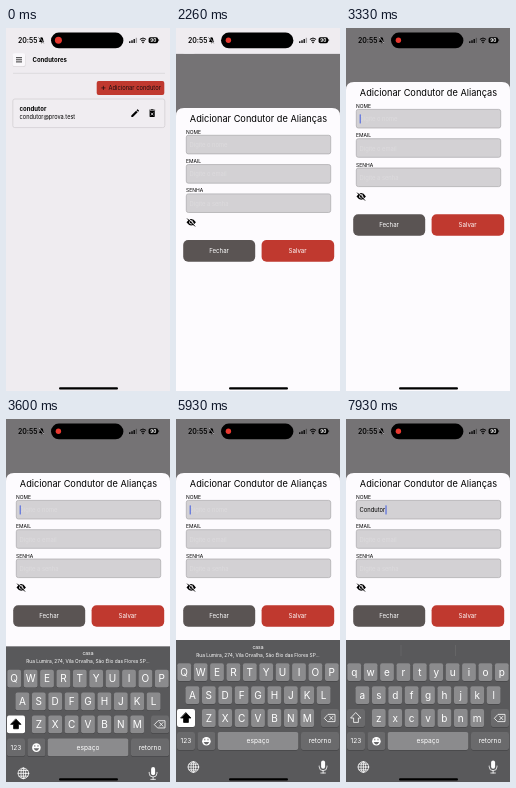
These frames come from a looping animation (164x363 px, 8000 ms). An HTML page:

```html
<!DOCTYPE html>
<html lang="pt-BR">
<head>
<meta charset="utf-8">
<title>Condutores</title>
<style>
  html, body { margin: 0; width: 100%; height: 100%; overflow: hidden; background: #efecf0; }
  svg { display: block; width: 100vw; height: 100vh; font-family: Inter, "Noto Sans", sans-serif; }
  .mid { text-anchor: middle; }
  .bold { font-weight: 700; }
  #keyboard { fill: #fff; }
  .line { fill: none; stroke: #fff; stroke-width: .8; stroke-linecap: round; stroke-linejoin: round; }
</style>
</head>
<body>
<svg viewBox="0 0 164 363">
  <g id="page">
    <rect width="164" height="363" fill="#efecf0"/>
    <rect x="6.6" y="26" width="13" height="13" rx="2" fill="#d8d5d9"/>
    <rect x="6.6" y="25.3" width="12.6" height="13" rx="2" fill="#faf8fb"/>
    <path d="M10 29.7h6M10 31.8h6M10 33.9h6" stroke="#222" stroke-width=".9"/>
    <text class="bold" x="26.5" y="33.8" font-size="6">Condutores</text>
    <path d="M7 45.3h152" stroke="#d9d6da" stroke-width=".8"/>
    <rect x="90.7" y="53" width="67.6" height="14" rx="2" fill="#c0392f"/>
    <path d="M95.3 59.9h4.2M97.4 57.8v4.2" stroke="#1c0f10" stroke-width=".7"/>
    <text x="102.5" y="62" font-size="5.8" fill="#1c0f10">Adicionar condutor</text>
    <rect x="6.8" y="71" width="152" height="28.6" rx="2" fill="#f0edf1" stroke="#d3d0d4" stroke-width=".8"/>
    <text class="bold" x="13.6" y="83" font-size="6">condutor</text>
    <text x="13.6" y="90.6" font-size="5.6">condutor@prova.test</text>
    <path transform="translate(124 80) scale(.43)" d="M3 17.25V21h3.75L17.81 9.94l-3.75-3.75L3 17.25zM20.71 7.04c.39-.39.39-1.02 0-1.41l-2.34-2.34c-.39-.39-1.02-.39-1.41 0l-1.83 1.83 3.75 3.75 1.83-1.83z"/>
    <g transform="translate(141 80) scale(.43)">
      <path d="M6 19q0 2 2 2h8q2 0 2-2V7H6zM15.5 4l-1-1h-5l-1 1H5v2h14V4z"/>
      <path d="M9.3 11l5.4 6M14.7 11l-5.4 6" stroke="#efecf0" stroke-width="1.8"/>
    </g>
  </g>

  <g id="modal">
    <rect width="164" height="363" fill="#757375"/>
    <path d="M0 363V62q0-8 8-8h148q8 0 8 8v301z" fill="#fdfbfe"/>
    <text class="mid" x="82.5" y="68.4" font-size="9.2">Adicionar Condutor de Alianças</text>
    <g id="fields"></g>
    <text id="typed" x="13.6" y="93.2" font-size="5.8"></text>
    <rect id="caret" y="86.3" width="1" height="9.2" rx=".5" fill="#3f5be0"/>
    <g transform="translate(15.2 168.4)">
      <path d="M-4.7 0Q0-6.6 4.7 0Q0 6.6-4.7 0z"/>
      <circle r="2.1" fill="#fdfbfe"/><circle r="1.3"/>
      <path d="M-3.4-4.2L4.4 3.6" stroke="#fdfbfe" stroke-width="1"/>
      <path d="M-4-3.7L3.8 4.1" stroke="#000" stroke-width="1"/>
    </g>
    <g class="mid" font-size="6.1" fill="#fff">
      <rect x="7.2" y="186.2" width="72" height="21.6" rx="5" fill="#5a5453"/>
      <text x="43" y="199.2">Fechar</text>
      <rect x="85.6" y="186.2" width="72.6" height="21.6" rx="5" fill="#c0392f"/>
      <text x="121.6" y="199.2">Salvar</text>
    </g>
  </g>

  <g id="keyboard">
    <rect y="221" width="164" height="142" fill="#59595b"/>
    <g id="address" class="mid" font-size="5">
      <text x="82" y="229.6">casa</text>
      <text x="82" y="237.8" font-size="4.8">Rua Lumira, 274, Vila Orvalha, São Élio das Flores SP...</text>
    </g>
    <path id="dividers" d="M55 226v11M109.5 226v11" stroke="#6e6e70" stroke-width=".6"/>
    <g id="keys" class="mid"></g>
    <path id="arrow" class="line" d="M10 293.8l5 5.2h-2.6v4.4h-4.8V299H5z"/>
    <path class="line" d="M148.6 299l3.4-3.6h7v7.2h-7zM153.6 297.2l3.4 3.6M157 297.2l-3.4 3.6"/>
    <circle cx="30.4" cy="322.3" r="4.3"/>
    <path d="M27.6 323q2.8 5 5.6 0z" fill="#6a6a6c"/>
    <path d="M28.8 319.8v1.6M32 319.8v1.6" stroke="#6a6a6c" stroke-width=".9"/>
    <g class="line" transform="translate(17.4 348)">
      <circle r="5.3"/><ellipse rx="2.4" ry="5.3"/>
      <path d="M-5.3 0H5.3M0-5.3V5.3M-4.4-2.8H4.4M-4.4 2.8H4.4"/>
    </g>
    <rect x="145.1" y="341.6" width="4" height="8.2" rx="2"/>
    <path class="line" d="M143.2 347v.8q0 3.9 3.9 3.9t3.9-3.9v-.8M147.1 351.8v2.2M144.8 354h4.6"/>
    <g id="popup" class="mid">
      <path d="M-9-32h18q3 0 3 3v13q0 3-2.6 5T6.9-5V7q0 2-2 2h-9.8q-2 0-2-2V-5q0-4-2.5-6T-12-16v-13q0-3 3-3z" fill="#8b8b8d"/>
      <text id="preview" y="-15" font-size="15"></text>
    </g>
  </g>

  <g id="status">
    <text x="12" y="14.8" font-size="6.9" font-weight="600">20:55</text>
    <path d="M32.8 14q1-1 1-2.6q0-2.2 1.7-2.2t1.7 2.2q0 1.6 1 2.6zM34.6 14.5h1.8l-.9.9z"/>
    <path d="M32.9 9.3l5.2 5.8" stroke="#efecf0" stroke-width="1"/>
    <path d="M32.5 9.5l5.2 5.8" stroke="#000" stroke-width=".6"/>
    <rect x="45" y="4.6" width="72.4" height="15.6" rx="7.8"/>
    <circle id="record" cx="52.4" cy="12.2" fill="#e8382f"/>
    <path d="M123.8 15v-1.7M126 15v-2.8M128.2 15v-4" stroke="#000" stroke-width="1.3"/>
    <path d="M130.4 15V9.8" stroke="#000" stroke-opacity=".35" stroke-width="1.3"/>
    <path d="M133.9 11.4q3.1-2.8 6.2 0M135.1 12.9q1.9-1.7 3.8 0" fill="none" stroke="#000" stroke-width="1"/>
    <circle cx="137" cy="14.4" r=".8"/>
    <rect x="142.6" y="9.2" width="9.4" height="6" rx="1.8"/>
    <path d="M152.6 11.2v2" stroke="#000" stroke-width=".7"/>
    <text class="mid bold" x="147.3" y="13.9" font-size="4.6" fill="#fff">90</text>
    <rect x="53" y="359.3" width="59" height="2.2" rx="1.1"/>
  </g>
</svg>
<script>
const LOOP = 8000;
const WORD = 'Condutor';
const PRESSES = [6600, 6760, 6940, 7120, 7300, 7480, 7640, 7800];
const PRESS_LENGTH = 95;
const $ = id => document.getElementById(id);

function add(parent, tag, attrs, text = '') {
  const el = document.createElementNS('http://www.w3.org/2000/svg', tag);
  for (const name in attrs) el.setAttribute(name, attrs[name]);
  el.textContent = text;
  return parent.appendChild(el);
}

const hints = [['NOME', 'Digite o nome'], ['EMAIL', 'Digite o email'], ['SENHA', 'Digite a senha']].map(([label, hint], i) => {
  const y = 81.4 + i * 29.3;
  add($('fields'), 'text', { x: 10, y: y - 1.5, 'font-size': 5 }, label);
  add($('fields'), 'rect', { x: 10.3, y, width: 144.4, height: 18.6, rx: 2, fill: '#d3d1d4', stroke: '#aaa8ab', 'stroke-width': .7 });
  return add($('fields'), 'text', { x: 13.6, y: y + 11.8, 'font-size': 5.8, fill: '#dcdadd' }, hint);
});

function addKey(x, y, width, label, size = 10, fill = '#8b8b8d') {
  const box = { x: x - width / 2, width, height: 17.8, rx: 2 };
  add($('keys'), 'rect', { ...box, y: y - 8.4, fill: '#3d3d3f' });
  const face = add($('keys'), 'rect', { ...box, y: y - 8.9, fill });
  const text = add($('keys'), 'text', { x, y: y + size * .36, 'font-size': size }, label);
  return { x, y, face, text };
}

const SPECIAL = '#6a6a6c';
const letters = {};
['qwertyuiop', 'asdfghjkl', 'zxcvbnm'].forEach((row, r) => [...row].forEach((c, i) => {
  letters[c] = addKey(82 + (i - (row.length - 1) / 2) * 16.4, 253.2 + r * 22.9, 13.8, c);
}));
const shift = addKey(10, 299, 18, '', 10, SPECIAL);
addKey(154, 299, 18, '', 10, SPECIAL);
addKey(10, 322, 18, '123', 6.6, SPECIAL);
addKey(30.4, 322, 18, '', 10, SPECIAL);
addKey(82, 322, 80.6, 'espaço', 6.6);
addKey(144, 322, 38, 'retorno', 6.6, SPECIAL);

const clamp = v => Math.min(1, Math.max(0, v));

// cubic-bezier(.32, .72, 0, 1)
function ease(x) {
  let low = 0, high = 1;
  for (let i = 0; i < 20; i++) {
    const s = (low + high) / 2;
    if (.96 * (1 - s) ** 2 * s + s ** 3 < x) low = s; else high = s;
  }
  return 2.16 * (1 - low) ** 2 * low + 3 * (1 - low) * low ** 2 + low ** 3;
}

const slide = (id, t, start, length, distance) => {
  const p = clamp((t - start) / length);
  $(id).setAttribute('transform', `translate(0 ${distance * (1 - ease(p))})`);
  $(id).style.display = p > 0 ? '' : 'none';
};

function draw(t) {
  slide('modal', t, 2020, 570, 363);
  slide('keyboard', t, 3340, 520, 142);
  $('record').setAttribute('r', 3.5 - .8 * clamp(t / 860));

  const count = PRESSES.filter(p => t >= p).length;
  const typing = count > 0;
  $('typed').textContent = WORD.slice(0, count);
  hints[0].style.display = typing ? 'none' : '';

  const blink = (t - 3260) % 1080 / 1080;
  $('caret').setAttribute('x', 13.7 + (typing ? $('typed').getComputedTextLength() + .2 : 0));
  $('caret').setAttribute('opacity', t < 3260 ? 0 : typing ? 1 : clamp((.62 - blink) / .1) + clamp((blink - .9) / .1));

  for (const c in letters) letters[c].text.textContent = typing ? c : c.toUpperCase();
  shift.face.setAttribute('fill', typing ? SPECIAL : '#fff');
  $('arrow').style.cssText = typing ? '' : 'fill:#000;stroke:#000';
  $('address').style.display = typing ? 'none' : '';
  $('dividers').style.display = typing ? '' : 'none';

  const pressed = typing && t - PRESSES[count - 1] < PRESS_LENGTH;
  $('popup').style.display = pressed ? '' : 'none';
  if (pressed) {
    const c = WORD[count - 1], key = letters[c.toLowerCase()];
    $('popup').setAttribute('transform', `translate(${key.x} ${key.y})`);
    $('preview').textContent = c;
  }
}

function tick() {
  draw(performance.now() % LOOP);
  requestAnimationFrame(tick);
}
tick();
</script>
</body>
</html>
```
